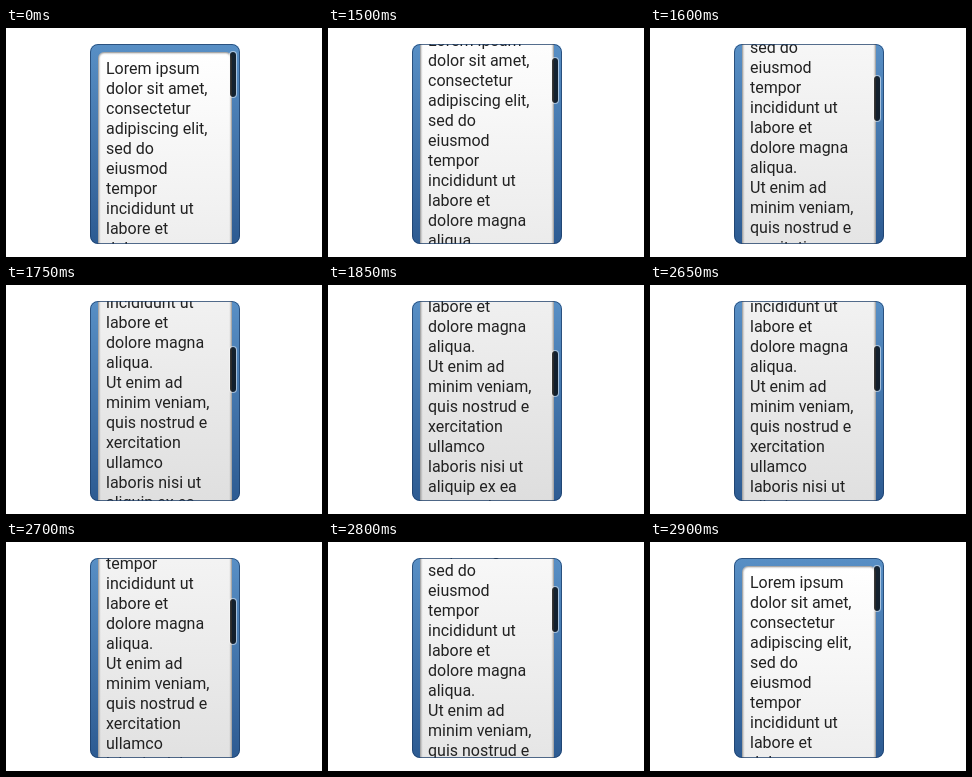
These frames come from a looping animation (316 px wide and 229 px high, 4200 ms). An HTML page:

```html
<!DOCTYPE html>
<html lang="la">
<head>
<meta charset="utf-8">
<title>Scrolling panel</title>
<style>
  html, body { margin: 0; width: 100%; height: 100%; overflow: hidden; background: #fff; }
  #panel {
    position: absolute; left: 84px; top: 16px; width: 150px; height: 200px;
    overflow: hidden; border-radius: 8px;
    background: linear-gradient(#588fc5, #2d5b92);
  }
  #panel::after {
    content: ""; position: absolute; inset: 0; border-radius: 8px;
    border: 1px solid rgba(28, 62, 104, .75); box-sizing: border-box;
  }
  #page {
    position: absolute; left: 8px; top: 8px; width: 134px; height: 757px;
    box-sizing: border-box; padding: 6px 7px; border: 1px solid #a8a8a8; border-radius: 6px;
    background: linear-gradient(#fff, #bbb);
    font: 16px/20px Roboto, sans-serif; color: #222; white-space: pre;
    box-shadow: inset 0 0 2px rgba(0, 0, 0, .5);
  }
  #thumb {
    position: absolute; left: 139px; top: 7px; width: 8px; height: 47px;
    box-sizing: border-box; border: 1px solid rgba(255, 255, 255, .5); border-radius: 4px;
    background: rgba(0, 0, 0, .75); background-clip: padding-box;
  }
</style>
</head>
<body>
<div id="panel">
  <div id="page">Lorem ipsum
dolor sit amet,
consectetur
adipiscing elit,
sed do
eiusmod
tempor
incididunt ut
labore et
dolore magna
aliqua.
Ut enim ad
minim veniam,
quis nostrud e
xercitation
ullamco
laboris nisi ut
aliquip ex ea
commodo
consequat.</div>
  <div id="thumb"></div>
</div>
<script>
  const LOOP = 4200, STEP = 50, THUMB_RATIO = 0.238;
  // Scroll offsets, one per step, from the start of each movement.
  const down = { start: 1500, offsets: [28, 64, 101, 129, 149, 163, 173, 179, 183, 185] };
  const back = { start: 2650, offsets: [159, 139, 118, 92, 54, 0] };
  const page = document.getElementById("page");
  const thumb = document.getElementById("thumb");

  function scrollAt(time) {
    if (time < down.start) return 0;
    const { start, offsets } = time < back.start ? down : back;
    const step = Math.floor((time - start) / STEP);
    return offsets[Math.min(step, offsets.length - 1)];
  }

  const origin = performance.now();
  function draw() {
    const offset = scrollAt((performance.now() - origin) % LOOP);
    page.style.transform = `translateY(${-offset}px)`;
    thumb.style.transform = `translateY(${Math.floor(offset * THUMB_RATIO)}px)`;
    requestAnimationFrame(draw);
  }
  draw();
</script>
</body>
</html>
```
